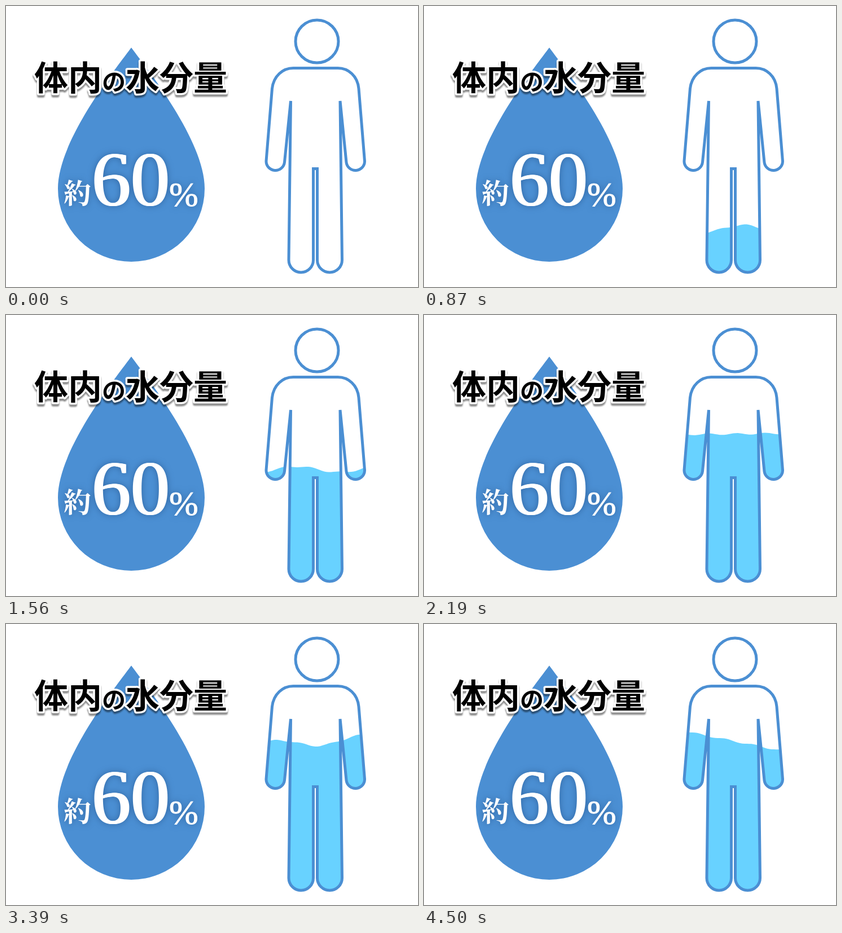
Animation of 730 by 500 pixels, one loop 4530 ms. Source, as an HTML page:

```html
<!DOCTYPE html>
<html lang="ja">
<head>
<meta charset="utf-8">
<title>体内の水分量</title>
<style>
html, body { margin: 0; width: 100%; height: 100%; overflow: hidden; background: #fff; }
svg { display: block; width: 100vw; height: 100vh; }
.title {
  font: 900 60px "Noto Sans CJK JP", "Noto Sans CJK", sans-serif;
  stroke: #fff; stroke-width: 7; stroke-linejoin: round; paint-order: stroke;
  filter: drop-shadow(0 4px 1px rgba(0, 0, 0, .45));
}
.title .small { font-size: 42px; }
.share { fill: #fff; filter: drop-shadow(0 0 6px rgba(30, 75, 130, .6)); }
.num { font-family: "Liberation Serif", serif; text-shadow: 1.5px 0 #fff, -1.5px 0 #fff; }
.unit { font-family: "Liberation Serif", serif; }
.kanji { font: 600 49px "Noto Serif CJK JP", "Noto Sans CJK JP", "Noto Sans CJK", serif; }
.line { fill: none; stroke: #4b8fd3; stroke-width: 5; }
</style>
</head>
<body>
<svg viewBox="0 0 730 500">
  <defs>
    <path id="body" d="M509 110.500H588C607 110.500 623 125 625 147L635.500 276A16.300 16.300 0 0 1 603 278L592 169L595.500 452A22 22 0 0 1 551.500 452V289.500H544.500V452A21.750 22 0 0 1 501 452L504.500 169L493.500 278A16.300 16.300 0 0 1 461 276L471.500 147C474 125 490 110.500 509 110.500Z"/>
    <clipPath id="inside"><use href="#body"/></clipPath>
  </defs>
  <path fill="#4b8fd3" d="M222 74C250 112 352 240 352 325A130 130 0 0 1 92 325C92 240 194 112 222 74Z"/>
  <text class="title" x="50" y="150">体内<tspan class="small">の</tspan>水分量</text>
  <g class="share">
    <text class="kanji" x="102" y="351">約</text>
    <text class="num" x="152" y="354.500" font-size="138">60</text>
    <text class="unit" x="289" y="355.500" font-size="62" stroke="#fff">%</text>
  </g>
  <path id="water" fill="#68d2ff" clip-path="url(#inside)"/>
  <use href="#body" class="line"/>
  <circle class="line" cx="551" cy="63" r="38"/>
</svg>
<script>
const LOOP = 4530, STEP = 30, FULL = 212.5;
const LEFT = 452, RIGHT = 648, MID = 550;
const water = document.getElementById('water');
const wave = turns => Math.cos(2 * Math.PI * turns);

// Steady rise that settles softly at the full mark, then bobs
function level(t) {
  const above = 398 - .18 * (t - 870) - FULL;
  return FULL + (above + Math.hypot(above, 6)) / 2 + 4 * wave((t - 3870) / 1300);
}

// Water height at x: growing tilt, travelling swell, fine ripple
function surface(t) {
  const base = level(t);
  const tilt = 18 * (t / 4500) ** 3 * wave((t - 4450) / 1700);
  const swell = 7 * Math.abs(Math.sin(Math.PI * (t - 2190) / 2310));
  const crest = 490 + .145 * (t - 870);
  return x => base
    + tilt * (x - MID) / 88
    + swell * wave((x - crest) / 150)
    - 1.5 * wave((x - 485) / 50 - (t - 4500) / 500);
}

function draw(now) {
  const y = surface(Math.floor(now % LOOP / STEP) * STEP);
  let d = `M${LEFT} 500`;
  for (let x = LEFT; x <= RIGHT; x += 4) d += `L${x} ${y(x).toFixed(2)}`;
  water.setAttribute('d', d + 'V500Z');
}

const start = performance.now();
function tick() {
  draw(performance.now() - start);
  requestAnimationFrame(tick);
}
tick();
</script>
</body>
</html>
```
